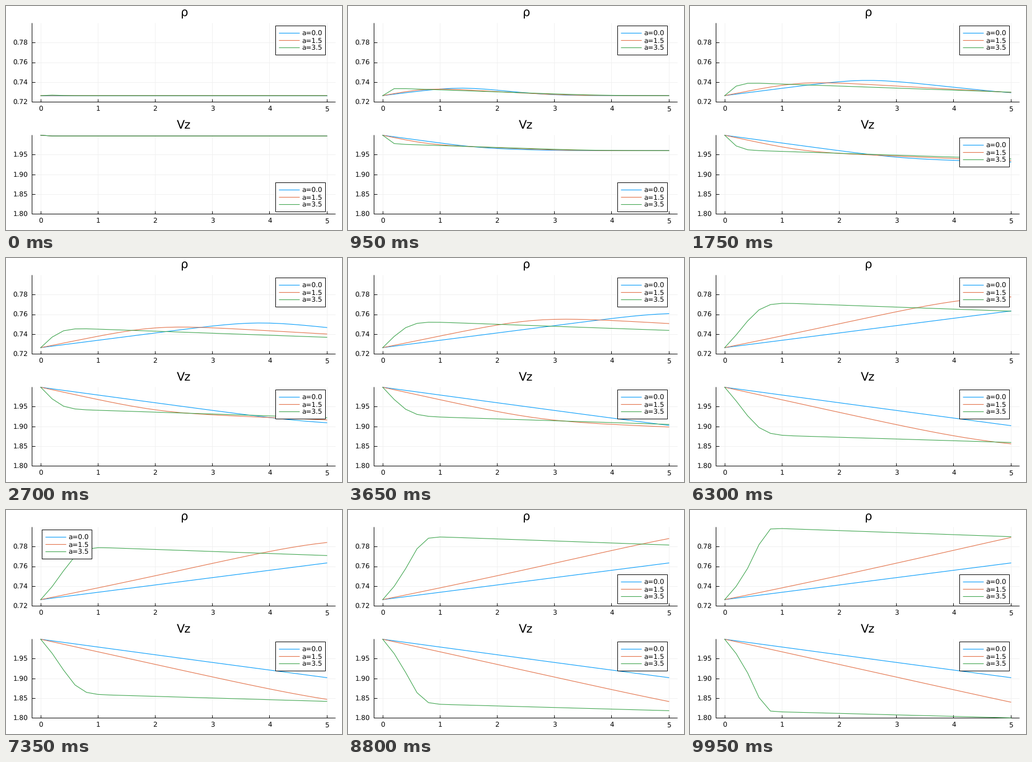
Recreate the animation shown at these times as a matplotlib script. Size 600 by 400 pixels, loop 10 s.

```python
import numpy as np
import matplotlib.pyplot as plt
from matplotlib.animation import FuncAnimation
from matplotlib.patches import Rectangle
from matplotlib.transforms import Affine2D

W, H, DPI = 600, 400, 100
FRAMES, INTERVAL = 200, 50
PX = 72 / DPI
COLORS = ["#009AFA", "#E26F46", "#3DA44D"]
NAMES = ["a=0.0", "a=1.5", "a=3.5"]
GRID = "#f0f0f0"
TICK_SIZE, TITLE_SIZE = 12, 21
LEFT, RIGHT = 46.7, 588.3

plt.rcParams["font.family"] = "DejaVu Sans"
plt.rcParams["text.hinting"] = "no_hinting"
z = np.linspace(0, 5, 26)


# Each curve blends a steady profile near the inlet with a wave
# that travels outwards and keeps growing in time.

def soft_min(a, b, w):
    return -w * np.logaddexp(-a / w, -b / w)


def since(t, arrival):
    """Time since the wave arrived, with a smooth start."""
    s = 0.09 * np.sqrt(t)
    return s * np.logaddexp(0, (t - arrival) / s)


def inlet_blur(t):
    """Width of the blend for the steep case: grows, then sharpens."""
    return np.sin(np.pi * t / 11.5) * ((z + 0.01) / 0.5) ** 0.4


def pinned(d):
    d = np.maximum(d, 0)
    d[0] = 0
    return d


def density(t):
    low = soft_min(0.00743 * z, 0.0193 * since(t, z / 3.05 + 0.05),
                   0.0034 * t ** 0.3)
    mid = soft_min(0.0117 * z + 0.00021 * z ** 2,
                   0.0112 * since(t, z / 3.4 + 0.05), 0.0033 * t ** 0.55)
    high = soft_min(0.0379 * np.expm1(1.52 * z),
                    0.00735 * since(t, 0.28 * z - 0.076),
                    0.0164 * inlet_blur(t))
    return [0.7265 + pinned(d) for d in (low, mid, high)]


def velocity(t):
    free = 0.039 * t
    low = soft_min(0.0198 * z - 0.00006 * z ** 2,
                   free - 0.013 * since(t, z / 3), 0.0038 * t ** 0.6)
    mid = soft_min(0.0318 * z + 0.00009 * z ** 2,
                   free - 0.0201 * since(t, z / 3.3 + 0.03),
                   0.0056 * t ** 0.6)
    wave = (0.0026 + 0.0189 * t - 0.00011 * t ** 2
            + (0.0048 - 0.00001 * t ** 2) * z)
    high = soft_min(0.1067 * np.expm1(1.47 * z),
                    soft_min(free, wave, 0.0015 * np.sqrt(t)),
                    0.042 * inlet_blur(t))
    return [2 - pinned(d) for d in (low, mid, high)]


fig = plt.figure(figsize=(W / DPI, H / DPI), dpi=DPI, facecolor="white")
ax = fig.add_axes([0, 0, 1, 1])
ax.set_xlim(0, W)
ax.set_ylim(H, 0)
ax.axis("off")


def rule(x0, y0, x1, y1, color="black", width=1.0, **kw):
    """Straight line, moved half a pixel so that it snaps to its own row."""
    ax.plot([x0 - 0.5, x1 - 0.5], [y0 - 0.5, y1 - 0.5], color=color,
            lw=width * PX, solid_capstyle="butt", **kw)


def label(x, y, text, size=TICK_SIZE, ha="center", **kw):
    ax.text(x, y, text, fontsize=size * PX, ha=ha, va="baseline", **kw)


def to_x(v):
    return 62 + 102.2 * v


class Panel:
    def __init__(self, title, top, bottom, lims, ticks):
        self.top, self.bottom, self.lims = top, bottom, lims
        for v in range(6):
            x = to_x(v)
            rule(x, top, x, bottom, GRID, zorder=1)
            rule(x, bottom, x, bottom - 5.5, zorder=2)
            label(x, bottom + 15.9, str(v))
        for v in ticks:
            y = self.to_y(v)
            rule(LEFT, y, RIGHT, y, GRID, zorder=1)
            rule(LEFT, y, LEFT + 5.5, y, zorder=2)
            label(39.3, y + 4.3, f"{v:.2f}", ha="right")
        rule(LEFT, top, LEFT, bottom, zorder=2)
        rule(LEFT, bottom, RIGHT, bottom, zorder=2)
        label(317.5, top - 11.8, title, TITLE_SIZE)

        clip = Rectangle((LEFT, top - 0.5), RIGHT - LEFT, bottom - top + 1,
                         transform=ax.transData)
        self.lines = [ax.plot([], [], color=c, lw=1.1 * PX, zorder=3)[0]
                      for c in COLORS]
        for line in self.lines:
            line.set_clip_path(clip)
        self.add_legend()

    def to_y(self, v):
        lo, hi = self.lims
        return self.bottom - (v - lo) / (hi - lo) * (self.bottom - self.top)

    def add_legend(self):
        self.shift = Affine2D()
        place = self.shift + ax.transData
        y0 = self.top + 5
        ax.add_patch(Rectangle((481, y0 - 0.5), 89, 52, fc="white",
                               ec="black", lw=PX, zorder=4, transform=place))
        for i, (color, name) in enumerate(zip(COLORS, NAMES)):
            y = y0 + 13 * (i + 1)
            rule(487, y, 524, y, color, 1.1, zorder=5, transform=place)
            label(528.4, y + 4.3, name, ha="left", zorder=5, transform=place)

    def update(self, curves, shift):
        for line, v in zip(self.lines, curves):
            line.set_data(to_x(z), self.to_y(v))
        self.shift.clear().translate(*shift)


rho = Panel("ρ", 30.5, 171.5, (0.72, 0.80), [0.72, 0.74, 0.76, 0.78])
vz = Panel("Vz", 230.8, 371.5, (1.80, 2.00), [1.80, 1.85, 1.90, 1.95])

TOP_RIGHT, TOP_LEFT, BOTTOM_RIGHT = (0, 0), (-417, 0), (0, 80)


def update(k):
    ms = k * INTERVAL
    t = ms / 1000 + 0.05
    if ms < 6600:
        rho_spot = TOP_RIGHT
    elif ms < 7500:
        rho_spot = TOP_LEFT
    else:
        rho_spot = BOTTOM_RIGHT
    rho.update(density(t), rho_spot)
    vz.update(velocity(t), BOTTOM_RIGHT if ms < 1500 else TOP_RIGHT)
    return rho.lines + vz.lines


anim = FuncAnimation(fig, update, frames=FRAMES, interval=INTERVAL,
                     repeat=True, repeat_delay=0, blit=False)
plt.show()
```
